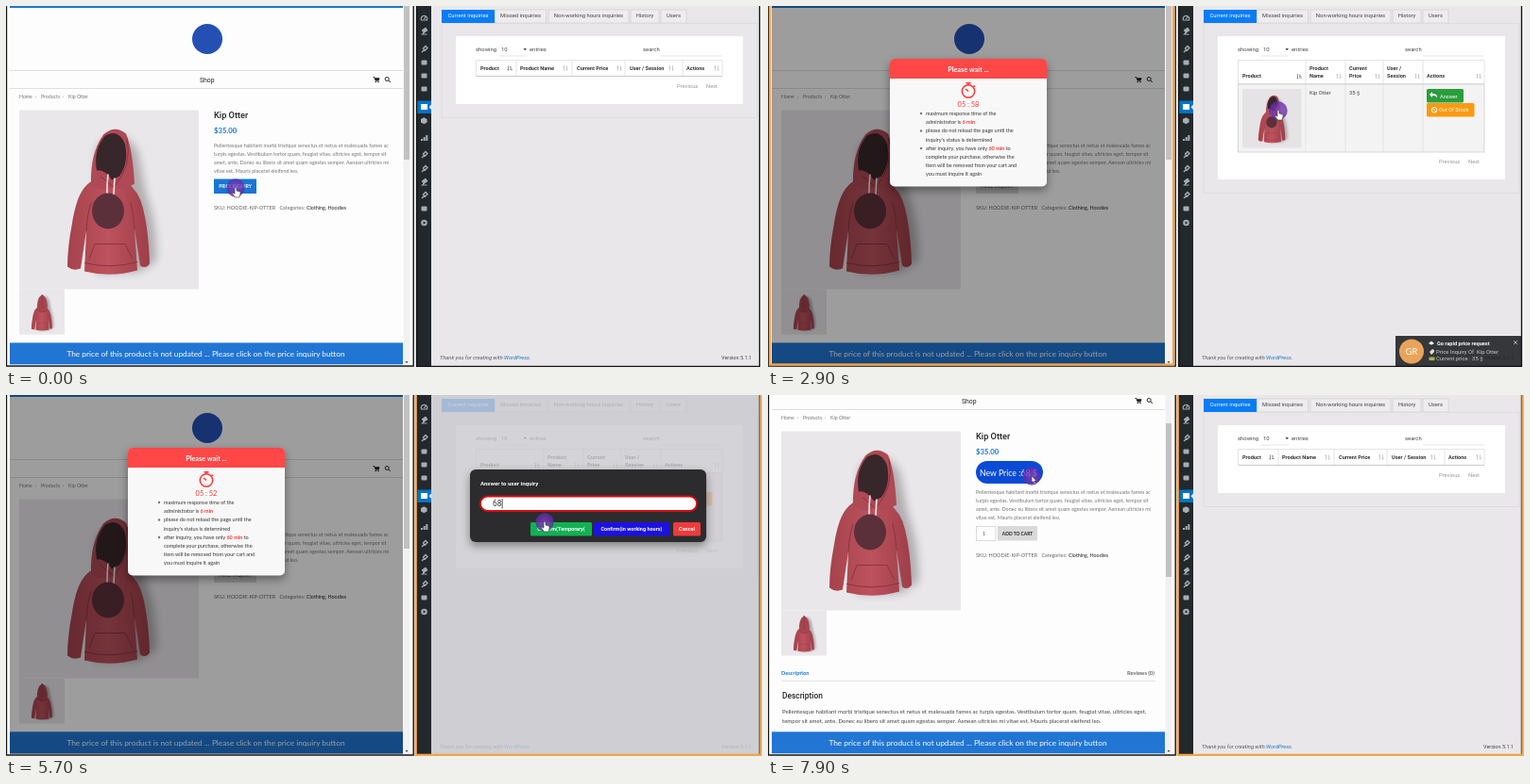
Animation of 800 by 383 pixels, one loop 8 s. Source, as an HTML page:

```html
<!DOCTYPE html>
<html lang="en">
<head>
<meta charset="utf-8">
<title>Price inquiry demo</title>
<style>
  html, body { margin: 0; width: 100%; height: 100%; overflow: hidden; background: #fff; }
  svg { display: block; width: 100%; height: 100%; }
  text { font-family: Lato, sans-serif; white-space: pre; }
  .r { font-family: Roboto, sans-serif; }
  .m { text-anchor: middle; }
  .b { font-weight: 700; }
  .h { font-weight: 500; }
  .i { font-style: italic; }
  .lift { filter: drop-shadow(0 4px 5px rgba(0, 0, 0, .4)); }
  .soft { filter: blur(5px); }
</style>
</head>
<body>
<svg id="stage" viewBox="0 0 800 383"></svg>
<script>
const rect = (x, y, w, h, fill, more = '') =>
  `<rect x="${x}" y="${y}" width="${w}" height="${h}" fill="${fill}" ${more}/>`;
const text = (x, y, size, fill, str, cls = '', id = '') =>
  `<text x="${x}" y="${y}" font-size="${size}" fill="${fill}" class="${cls}" id="${id}">${str}</text>`;
const path = (d, stroke, width = 1, fill = 'none') =>
  `<path d="${d}" stroke="${stroke}" stroke-width="${width}" fill="${fill}"/>`;
const dot = (x, y, r, fill, more = '') => `<circle cx="${x}" cy="${y}" r="${r}" fill="${fill}" ${more}/>`;
const group = (id, body, cls = '') => `<g id="${id}" class="${cls}">${body}</g>`;
const lines = (x, y, step, size, fill, list) =>
  list.map((s, i) => text(x, y + i * step, size, fill, s)).join('');

const product = 'Kip Otter';
const blurb = ['Pellentesque habitant morbi tristique senectus et netus et malesuada fames ac',
  'turpis egestas. Vestibulum tortor quam, feugiat vitae, ultricies eget, tempor sit',
  'amet, ante. Donec eu libero sit amet quam egestas semper. Aenean ultricies mi',
  'vitae est. Mauris placerat eleifend leo.'];

const defs = `<defs>
  <radialGradient id="halo"><stop offset="0" stop-color="#8d3fc0"/><stop offset="1" stop-color="#5c2aa6"/></radialGradient>
  <linearGradient id="cloth"><stop offset="0" stop-color="#a5434d"/><stop offset=".5" stop-color="#bd525d"/><stop offset="1" stop-color="#9d3e49"/></linearGradient>
  <clipPath id="page"><rect x="4" width="416" height="381"/></clipPath>
  <g id="body">
    <path class="soft" opacity=".25" d="M82 40Q112 14 126 46L134 88Q146 120 145 160L126 172L80 172Z"/>
    <path fill="url(#cloth)" d="M79 74C64 82 60 98 56 120Q51 146 51 166Q57 171 65 168L71 128L69 171Q97 178 125 170L122 126L128 165Q134 169 138 163Q137 128 131 104Q127 86 113 76Z"/>
    <path fill="none" stroke="#8a3440" d="M71 128Q72 110 76 98M122 126Q121 110 118 98M69 162Q97 169 125 161M80 142H112L120 158M80 142L74 158"/>
  </g>
  <g id="front">
    <use href="#body"/>
    <path fill="#ae4955" d="M76 78Q75 46 89 26Q101 15 113 25Q120 42 122 78Q110 86 98 82Q86 88 76 78Z"/>
    <path fill="#37262a" d="M82 64Q78 42 91 27Q105 19 112 36Q116 56 106 70L98 74Q90 62 82 64Z"/>
    <path fill="none" stroke="#8a3440" d="M114 30Q120 58 100 82L86 70"/>
    <path fill="none" stroke="#f2e9ea" stroke-width="1.6" d="M94 68Q92 86 94 100M101 72Q99 92 100 112"/>
    <ellipse cx="94" cy="107" rx="17" ry="19" fill="#5b303a"/>
  </g>
  <g id="back">
    <use href="#body"/>
    <path fill="#a8444f" d="M76 88Q70 40 96 22Q122 38 118 88Q97 104 76 88Z"/>
    <path fill="none" stroke="#843340" stroke-width="2" d="M96 22V80M76 88Q97 104 118 88"/>
  </g>
</defs>`;

const photo = (x, y, size, id, bg = '#eae7ea') => rect(x, y, size, size, bg) +
  `<use href="#${id}" transform="translate(${x} ${y}) scale(${size / 190})"/>`;

const shop =
  rect(4, 0, 416, 2, '#1b78c8') +
  dot(213, 35, 16, '#2450b4') +
  path('M4 68.5H420M4 87.5H420', '#dedede') +
  text(205, 80.5, 6.8, '#222', 'Shop', 'r') +
  path('M388.5 75.5h1.3l1.2 3.6h3.2l.8-2.4h-4.6', '#222', .9, '#222') +
  dot(391.3, 80.5, .8, '#222') + dot(394, 80.5, .8, '#222') +
  path('M404.8 79l2 2M405.2 77.5a2 2 0 1 1-4 0a2 2 0 1 1 4 0', '#222') +
  text(14, 98, 5.2, '#777', 'Home') + text(31, 98, 5.2, '#999', '›') +
  text(37, 98, 5.2, '#777', 'Products') + text(60, 98, 5.2, '#999', '›') + text(66, 98, 5.2, '#777', product) +
  photo(14, 110.5, 190, 'front') + photo(14, 300.5, 48, 'back') +
  text(220, 119, 9.2, '#222', product, 'r h') +
  text(220, 135, 7.7, '#1b78d0', '$35.00', 'b') +
  group('ask', lines(220, 149.5, 9.1, 5.4, '#777', blurb) +
    rect(220, 183.5, 45, 15.5, '#1976d2', 'id="askBox"') +
    text(242.5, 193, 4.8, '#fff', 'PRICE INQUIRY', 'm b', 'askText')) +
  group('buy', rect(220, 142, 71, 24, '#0a4bd6', 'rx="12"') +
    text(224, 157.5, 8.7, '#fff', 'New Price :68 $') +
    lines(220, 177, 9.1, 5.4, '#777', blurb) +
    rect(220.5, 211.5, 20.5, 15, '#fff', 'stroke="#ccc" stroke-width=".7"') + text(227, 221, 5.5, '#555', '1') +
    rect(243, 211, 42, 15.5, '#d9d9d9') + text(264, 220.6, 4.9, '#222', 'ADD TO CART', 'm b')) +
  group('sku', text(220, 216, 5.5, '#666', 'SKU: HOODIE-KIP-OTTER') + text(289.5, 216, 5.4, '#666', 'Categories:') +
    text(318, 216, 5.4, '#222', 'Clothing, Hoodies')) +
  text(14, 369, 5.7, '#1b78d0', 'Description', 'b') + text(380, 369, 5.7, '#666', 'Reviews (0)', 'b') +
  path('M14 375.5H410', '#e4e4e4') +
  text(15, 394, 8.4, '#222', 'Description', 'r h') +
  lines(15, 409.5, 10, 6.05, '#444', [
    blurb[0] + ' turpis egestas. Vestibulum tortor quam, feugiat vitae, ultricies eget,',
    'tempor sit amet, ante. Donec eu libero sit amet quam egestas semper. Aenean ultricies mi vitae est. Mauris placerat eleifend leo.']);

const red = s => `<tspan fill="#f33" font-weight="700">${s}</tspan>`;
const waitBox =
  rect(129, 56, 166, 135.5, '#f8f8f8', 'rx="5" class="lift"') +
  path('M129 77V61q0-5 5-5H290q5 0 5 5V77Z', 'none', 0, '#ff4747') +
  text(212, 69.5, 7.3, '#fff', 'Please wait ...', 'm b') +
  dot(212, 90.5, 6.7, 'none', 'stroke="#f33" stroke-width="1.5"') +
  path('M209.5 81.7h5M212 82v2M217.5 84.5l1.5 1.5M212 90.5l-3-2.5', '#f33', 1.5) +
  text(212, 106.5, 7.4, '#f33', '05 : 58', 'm', 'clock') +
  [114, 132.5, 151].map(y => dot(162, y, 1.2, '#777')).join('') +
  lines(167, 116, 9.2, 5.5, '#333', ['maximum response time of the', `administrator is ${red('6 min')}`,
    'please do not reload the page until the', "inquiry's status is determined",
    `after inquiry, you have only ${red('60 min')} to`, 'complete your purchase, otherwise the',
    'item will be removed from your cart and', 'you must inquire it again']);

const left = rect(0, 0, 432, 383, '#fff') + rect(4, 0, 416, 381, '#fdfdfd') +
  `<g clip-path="url(#page)">${group('scroll', shop)}` +
  rect(4, 357.3, 416, 23, '#2175d3') +
  text(211.5, 372, 8.3, '#fff', 'The price of this product is not updated ... Please click on the price inquiry button', 'm') +
  group('wait', rect(4, 0, 416, 381, '#000', 'opacity=".38"') + waitBox) + '</g>' +
  rect(420.5, 0, 7, 381, '#f1f1f1') + rect(421, 0, 6, 163, '#c1c1c1', 'id="thumb"') +
  path('M422.5 377h3l-1.5 2z', 'none', 0, '#444');

// Admin sidebar
const glyph = (y, i) => [
  path(`M439.5 ${y + 2}a3.3 3.3 0 1 1 6 0zM442.5 ${y + 1}l1.5-2.5`, '#a8adb3', 1.2),
  path(`M441 ${y + 3}l1-3l-2-1l4-3l2 3l-2 1zM439.5 ${y + 3}h6`, '#a8adb3', 1, '#a8adb3'),
  rect(439.5, y - 2.5, 6, 5, '#a8adb3', 'rx="1"'),
  path(`M440 ${y + 3}l3-3M441.5 ${y - 1}l2.5-2.5l2 2l-2.5 2.5z`, '#a8adb3', 1.4)][i];
const icons = [[13, 0], [27, 1], [46, 3], [60, 2], [74, 2], [88, 2], [158, 3], [173, 3],
  [187, 1], [201, 3], [215, 2]].map(a => glyph(...a)).join('');
const sidebar = rect(435, 0, 15, 383, '#23282d') + icons +
  rect(435, 100.5, 15, 13.5, '#0073c4') + path('M450 104.5l-2.5 2.7l2.5 2.7z', 'none', 0, '#e9e7ea') +
  rect(439, 104, 7, 6, '#fff') +
  path('M442.3 118.3l3.3 1.7v3.6l-3.3 1.7l-3.3-1.7v-3.6z', 'none', 0, '#a8adb3') +
  path('M440 143v-2M442.7 143v-4M445.3 143v-6', '#a8adb3', 2) +
  dot(442.5, 230, 3.3, '#a8adb3') + path('M441.6 228.3l2.7 1.7l-2.7 1.7z', 'none', 0, '#23282d');

const tabs = [[461, 56, 'Current inquiries'], [517.5, 54, 'Missed inquiries'], [574, 85, 'Non-working hours inquiries'],
  [661, 30, 'History'], [693, 27, 'Users']].map(([x, w, s], i) =>
    rect(x, 4, w, 14, i ? '#eeecef' : '#0a7cf5', i ? 'stroke="#cfcdd0" stroke-width=".7"' : '') +
    text(x + w / 2, 12.2, 5.9, i ? '#444' : '#fff', s, 'm r')).join('');

const sorter = (x, y) => path(`M${x - 1.5} ${y + 2.5}v-5l-1 1.2M${x + 1.5} ${y - 2.5}v5l1-1.2`, '#bbb', .8);
const sorted = (x, y) => path(`M${x - 1.5} ${y - 2.5}v5l-1-1.2M${x} ${y - 1.5}h1.5M${x} ${y}h2.3M${x} ${y + 1.6}h3`, '#777', .8);
const table = (heads, seps, sorts, headY, bottom) =>
  rect(461, 18.5, 334, bottom + 14 - 18, 'none', 'stroke="#dcdadd" stroke-width=".8"') +
  rect(476, 32, 304, bottom - 32, '#fff') +
  text(497, 48, 5.9, '#444', 'showing', 'r') + text(524, 48, 5.9, '#444', '10', 'r') +
  path('M547.5 45h3.4l-1.7 2.3z', 'none', 0, '#444') + text(554, 48, 5.9, '#444', 'entries', 'r') +
  text(674, 48, 5.9, '#444', 'search', 'r') + path('M522 53H551M693 53H758', '#ddd', .7) +
  path(`M497.5 ${headY}V57.5H758V${headY}` + seps.map(x => `M${x} 57.5V${headY}`).join(''), '#ddd', .8) +
  path(`M497.5 ${headY}H758`, '#bbb', .8) +
  heads.map(([x, y, s]) => text(x, y, 5.6, '#333', s, 'r b')).join('') +
  sorts.map((x, i) => (i ? sorter : sorted)(x, headY - 8.5)).join('') +
  text(710, bottom - 17, 5.8, '#999', 'Previous', 'r') + text(741, bottom - 17, 5.8, '#999', 'Next', 'r');

const emptyTable = table([[502, 67.5, 'Product'], [544, 67.5, 'Product Name'], [604, 67.5, 'Current Price'],
  [660, 67.5, 'User / Session'], [720, 67.5, 'Actions']], [540, 599, 655, 716], [533, 592, 649, 704, 752], 74.5, 104);
const fullTable = table([[502, 76, 'Product'], [573, 67.5, 'Product'], [573, 76, 'Name'], [615, 67.5, 'Current'],
  [615, 76, 'Price'], [655, 67.5, 'User /'], [655, 76, 'Session'], [697, 76, 'Actions']],
  [569, 611, 651, 693], [562, 604, 645, 687, 752], 83, 184) +
  rect(497.5, 83, 260.5, 72, '#f4f3f4', 'stroke="#ccc" stroke-width=".8"') +
  path('M569 83V155M611 83V155M651 83V155M693 83V155', '#ddd', .8) +
  photo(502, 88, 62.5, 'front', '#e6e3e6') +
  text(573, 93.5, 5.8, '#444', product, 'r') + text(615, 93.5, 5.8, '#444', '35 $', 'r') +
  rect(697, 88, 39, 14.5, '#2a9d3c', 'rx="1.5"') + path('M708 98q0-3-5-3v2l-3-3l3-3v2q6 0 5 5', 'none', 0, '#fff') +
  text(711, 97.5, 5.6, '#fff', 'Answer', 'r') +
  rect(697, 103, 50.5, 14.5, '#f99a12', 'rx="1.5"') +
  dot(705, 110.3, 2.8, 'none', 'stroke="#fff"') + path('M703 108.3l4 4', '#fff') +
  text(710, 112.4, 5.6, '#fff', 'Out Of Stock', 'r');

const toast = rect(664, 350, 133, 33, '#222428', 'opacity=".9"') + dot(681, 366.5, 13, '#e9a45a') +
  text(681, 370, 9.5, '#fff', 'GR', 'm') +
  path('M699 358l3-2.5l3 2.5l-3 1.5z', 'none', 0, '#fff') +
  text(708, 359.5, 5.6, '#fff', 'Go rapid price request', 'r b') +
  path('M700 367l3-3l2 1v2l-3 3z', 'none', 0, '#e9d9d0') + rect(699.5, 372.5, 6, 3.5, '#a8b545') +
  text(707, 368.8, 5.9, '#ccc', 'Price Inquiry Of  ' + product, 'r') +
  text(707, 376.3, 5.9, '#ccc', 'Current price : 35 $', 'r') +
  path('M789 355l4 4M793 355l-4 4', '#ccc', .8);

const button = (x, w, fill, s) => rect(x, 135, w, 14.5, fill, 'rx="1.5"') +
  text(x + w / 2, 144.3, 5.5, '#fff', s, 'm r b');
const answerBox = rect(491, 79, 250, 77, '#2c2c2e', 'rx="6" class="lift"') +
  text(502, 96, 6.1, '#fff', 'Answer to user inquiry', 'r b') +
  rect(502, 107.5, 229, 15.5, '#fff', 'rx="7.7" stroke="#d90b12" stroke-width="1.8"') +
  text(515, 118, 8.3, '#333', '', 'r', 'typed') + rect(515, 110, .8, 10.5, '#222', 'id="caret"') +
  button(555, 65, '#12b152', 'Confirm(Temporary(') + button(622, 80, '#1c12e0', 'Confirm(in working hours)') +
  button(706, 29, '#ef3b3b', 'Cancel');

const right = rect(432, 0, 368, 383, '#fff') + rect(449, 0, 348, 383, '#e9e7ea') + sidebar + tabs +
  group('empty', emptyTable) + group('full', fullTable) +
  text(459, 375, 5.7, '#555', 'Thank you for creating with <tspan fill="#1b78c0">WordPress</tspan>.', 'r i') +
  text(757, 375, 5.5, '#444', 'Version 5.1.1', 'r') +
  rect(435, 0, 362, 383, '#000', 'id="dim"') + rect(450, 0, 347, 383, '#cac9ce', 'id="haze"') +
  group('answer', answerBox) + group('toast', toast);

const frames = path('M.5 0V382H431.2V0M434.5 0V382.5H797.5V0', '#151515', 1.4) +
  group('leftGlow', path('M2 0V380.5H429V0', '#f0a44c', 2.4)) +
  group('rightGlow', path('M433.7 0V382H798.6V0', '#f0a44c', 2.4));

const pointer = group('cursor', dot(0, 0, 9.7, 'url(#halo)', 'opacity=".78"') +
  group('hand', path('M-1 0q1-1.3 2 0v3l3.5 1q1 .5.5 2l-1 4h-4.5l-3-4q0-1.4 1.2-.8l1.3 1z', '#333', .6, '#fff')) +
  group('arrow', path('M0 0v7l1.7-1.5l1.4 3l1.2-.6l-1.4-2.8h2.3z', '#333', .6, '#fff')));

const stage = document.getElementById('stage');
stage.innerHTML = defs + left + right + frames + pointer;

const el = id => document.getElementById(id);
const show = (id, on) => { el(id).style.display = on ? '' : 'none'; };
const ramp = (t, a, b) => Math.min(1, Math.max(0, (t - a) / (b - a)));
const ease = k => k * k * (3 - 2 * k);
const fade = (id, v) => { show(id, v > 0); el(id).setAttribute('opacity', v); };

// Pointer stops: time, x, y
const route = [[0, 243, 193], [1850, 243, 193], [2550, 540, 111], [2950, 540, 111], [3600, 717, 94], [4500, 717, 94],
  [5450, 570, 135], [6400, 570, 135], [6950, 690, 158], [7250, 690, 158], [7800, 279, 86], [8000, 279, 86]];
function place(t) {
  const i = route.findIndex(p => p[0] > t), [a, x, y] = route[i - 1], [b, u, v] = route[i];
  const k = ease(ramp(t, a, b));
  return [x + (u - x) * k, y + (v - y) * k];
}

function draw() {
  const t = performance.now() % 8000;
  const reloaded = t >= 7400, k = ease(ramp(t, 7550, 7800));

  el('scroll').setAttribute('transform', `translate(0 ${-72 * k})`);
  el('thumb').setAttribute('y', 30 * k);
  show('ask', !reloaded);
  show('buy', reloaded);
  el('sku').setAttribute('transform', `translate(0 ${reloaded ? 28 : 0})`);
  const askState = t < 1100 ? 0 : t < 1650 ? 1 : 2;
  el('askBox').setAttribute('fill', ['#1976d2', '#1d3b55', '#dcdcdc'][askState]);
  el('askText').setAttribute('fill', ['#fff', '#60708a', '#555'][askState]);

  fade('wait', reloaded ? 0 : ramp(t, 1500, 1750));
  const secs = 358 - Math.max(-2, Math.floor((t - 2480) / 470));
  el('clock').textContent = `0${Math.floor(secs / 60)} : ${String(secs % 60).padStart(2, '0')}`;

  const listed = t >= 2150 && t < 6700;
  show('full', listed);
  show('empty', !listed);
  fade('toast', ramp(t, 1700, 1850) * (1 - ramp(t, 4500, 4700)));
  fade('dim', .42 * ramp(t, 3800, 4000) * (1 - ramp(t, 4300, 4600)));
  fade('haze', .8 * ramp(t, 4300, 4600) * (1 - ramp(t, 6450, 6750)));
  fade('answer', ramp(t, 4300, 4500) * (1 - ramp(t, 6400, 6600)));
  const typed = t < 4900 ? '' : t < 5150 ? '6' : '68';
  el('typed').textContent = typed;
  el('caret').setAttribute('x', 515.3 + typed.length * 4.7);
  show('caret', t % 1000 > 450);

  show('leftGlow', t >= 500 && t < 3800);
  show('rightGlow', t >= 3800);
  const [x, y] = place(t);
  el('cursor').setAttribute('transform', `translate(${x} ${y})`);
  const arrow = t > 6500 || (t > 1950 && t < 2450);
  show('arrow', arrow);
  show('hand', !arrow);
  requestAnimationFrame(draw);
}
draw();
</script>
</body>
</html>
```
